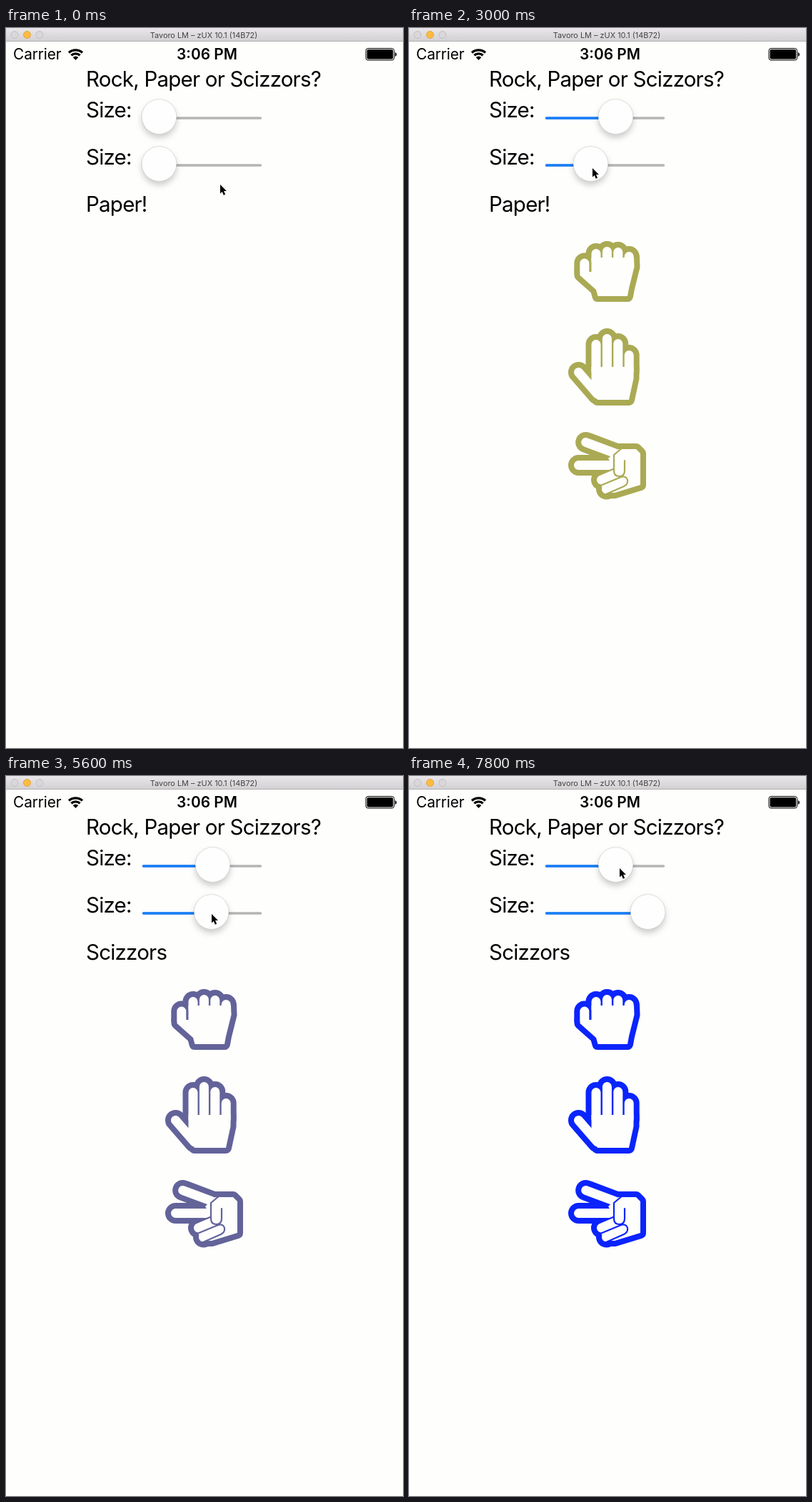
An HTML page that plays this animation: 556x1007 px, repeating every 8 s.

```html
<!DOCTYPE html>
<html lang="en">
<head>
<meta charset="utf-8">
<style>
  html, body { margin: 0; width: 100%; height: 100%; overflow: hidden; background: #fefefd; }
  svg { display: block; }
  text { font-family: Inter, sans-serif; }
  .body { font-size: 29.5px; letter-spacing: -.78px; }
  .status { font-size: 20.85px; }
  .track { stroke-width: 3.4; stroke-linecap: round; }
  .hand { --paper: #fefefd; stroke-linejoin: round; stroke-linecap: round; }
  .edge { fill: none; stroke: currentColor; stroke-width: 29; }
  .edge.palm { fill: currentColor; stroke-width: 16; }
  .skin { fill: none; stroke: var(--paper); stroke-width: 13; }
  .skin.palm { fill: var(--paper); stroke: none; }
  .crease { fill: none; stroke: currentColor; stroke-width: 2.2; }
</style>
</head>
<body>
<svg width="556" height="1007" viewBox="0 0 556 1007">
  <defs>
    <linearGradient id="bar" x2="0" y2="1">
      <stop stop-color="#e9e7e9"/><stop offset="1" stop-color="#d1cfd1"/>
    </linearGradient>
    <filter id="shadow" x="-40%" y="-40%" width="180%" height="190%">
      <feDropShadow dx="0" dy="5" stdDeviation="4.5" flood-color="#000" flood-opacity=".2"/>
    </filter>
  </defs>

  <rect width="556" height="19" fill="url(#bar)"/>
  <path d="M0 18.5H556" stroke="#b3b1b3"/>
  <g fill="#d9d7d9" stroke="#c2c0c2">
    <circle cx="12" cy="9.5" r="5"/>
    <circle cx="29.5" cy="9.5" r="5" fill="#fdbc40" stroke="#e0a23a"/>
    <circle cx="47" cy="9.5" r="5"/>
  </g>
  <text x="277" y="14" font-size="10.9" text-anchor="middle" fill="#444">Tavoro LM – zUX 10.1 (14B72)</text>

  <text class="status" x="10" y="44.3" letter-spacing="-.1">Carrier</text>
  <g fill="none" stroke="#000" stroke-width="3.3">
    <path d="M88 34.5A14 14 0 0 1 107 34.5M91.4 38.3A9 9 0 0 1 103.6 38.3"/>
    <path d="M97.5 45L93.7 41A5.4 5.4 0 0 1 101.3 41Z" fill="#000" stroke="none"/>
  </g>
  <text class="status" x="281.5" y="44.3" text-anchor="middle" font-weight="600">3:06 PM</text>
  <rect x="504" y="28.5" width="39.5" height="16.5" rx="3" fill="none" stroke="#000"/>
  <rect x="505.5" y="30" width="36.5" height="13.5" rx="1.8"/>
  <path d="M544.8 34Q547 34.5 547 37Q547 39.5 544.8 40Z"/>

  <g class="body">
    <text x="112" y="81.5">Rock, Paper or Scizzors?</text>
    <text x="112" y="124.5">Size:</text>
    <text x="112" y="190.5">Size:</text>
    <text id="label" x="112" y="256.5"></text>
  </g>
  <g id="sliders"></g>
  <g id="hands"></g>
  <path id="cursor" d="M0 0V12.5L2.8 9.9L4.8 14.8L7.1 13.8L5.1 9H8.9Z" stroke="#fff" paint-order="stroke"/>
</svg>
<script>
const LOOP = 8000, STEP = 200, MID = 277.8;
const $ = id => document.getElementById(id);
const ramp = (t, a, b) => Math.min(1, Math.max(0, (t - a) / (b - a)));
const easeOut = k => 1 - (1 - k) ** 2;
const mix = (a, b, k) => a + (b - a) * k;

function add(parent, tag, attrs) {
  const el = document.createElementNS('http://www.w3.org/2000/svg', tag);
  for (const k in attrs) el.setAttribute(k, attrs[k]);
  return parent.appendChild(el);
}

const thumbX = v => 214.5 + 120 * v;

function makeSlider(y) {
  const g = add($('sliders'), 'g', { transform: `translate(0 ${y})` });
  add(g, 'path', { class: 'track', stroke: '#b5b5b5', d: 'M192.5 126H356.5' });
  const fill = add(g, 'path', { class: 'track', stroke: '#157efb' });
  const thumb = add(g, 'circle', {
    r: 24.4, cy: 124, fill: '#fefefe', stroke: '#000', 'stroke-opacity': .16,
    'stroke-width': .8, filter: 'url(#shadow)'
  });
  return v => {
    fill.setAttribute('d', `M192.5 126H${thumbX(v)}`);
    thumb.setAttribute('cx', thumbX(v));
  };
}

// four upright fingers side by side
const fingers = (tops, end) => tops.map((y, i) => `M${262 + i * 15.4} ${y}V${end}`).join('');

// y: centre at full size, top: where the centre goes as the hand shrinks to nothing
const hands = [
  { name: 'Rock!', tap: 3800, y: 340.5, top: 279,
    bones: fingers([315.5, 312.5, 313.5, 319.5], 326) + 'M245.8 329V341',
    palm: 'M255.5 321H315L315.5 334L308 364L306 375H264.5L262 366L239.5 346V341H255.5Z',
    crease: '' },
  { name: 'Paper!', tap: 4400, y: 474, top: 301.5,
    bones: fingers([442.5, 434.5, 441.5, 457.5], 480) + 'M237.5 481.5L264 512',
    palm: 'M255.5 474H314.5V490L308 520H264L255.5 505Z',
    crease: '' },
  { name: 'Scizzors', tap: 5000, y: 611.5, top: 323.5,
    bones: 'M247.7 579.5L288 594.5M237.5 611.5H282M269.5 632L290 622.5M276.5 645L298 635',
    palm: 'M279 602L293 589H318L324 595V639L288 650H274L264 629L288 617Z',
    crease: 'M299 587L287 597V619Q287 627 294.5 627Q302 627 302 619V605M264 626L287 616.5M268 640L297 628Q304 626 306 632Q307 638 301 641L276 652' }
];
for (const h of hands) {
  h.el = add($('hands'), 'g', { class: 'hand' });
  for (const layer of ['edge', 'skin']) {
    add(h.el, 'path', { class: layer, d: h.bones });
    add(h.el, 'path', { class: layer + ' palm', d: h.palm });
  }
  add(h.el, 'path', { class: 'crease', d: h.crease });
}

// slider values over time
const sizeAt = t => .41 * easeOut(ramp(t, 600, 2000)) + .27 * ramp(t, 2000, 2200) - .055 * ramp(t, 2200, 2400);
const tintAt = t => .333 * ramp(t, 2600, 3000) + .4 * ramp(t, 3000, 3400) - .123 * ramp(t, 3400, 3600)
  + .04 * ramp(t, 6200, 6800) + .35 * ramp(t, 6800, 7400);

// pointer legs: start, end, goal; a goal on a thumb keeps following it
const legs = [
  [200, 600, t => [thumbX(sizeAt(t)) + 4, 153]],
  [2400, 2600, t => [thumbX(tintAt(t)) + 2.5, 196]],
  [3600, 3800, () => [286, 338]],
  [3800, 4400, () => [289, 500]],
  [4600, 5000, () => [280, 612]],
  [5200, 5600, () => [288, 193]],
  [5600, 6200, t => [thumbX(tintAt(t)) + 9.5, 189]],
  [7400, 7800, () => [295, 129]]
];
const pointerAt = t => legs.reduce((p, [a, b, goal]) => {
  const k = easeOut(ramp(t, a, b)), g = goal(t);
  return p.map((v, i) => mix(v, g[i], k));
}, [300, 219]);

// yellow to blue
function colorAt(v) {
  const warm = 255 * (1 - v);
  return `rgb(${Math.max(11, warm)}, ${Math.max(36, warm)}, ${Math.max(56, 252 * v)})`;
}

const setSize = makeSlider(0), setTint = makeSlider(66);

function render(t) {
  const size = sizeAt(t), tint = tintAt(t);
  setSize(size);
  setTint(tint);
  const scale = size && .04 + 1.536 * size;
  let label = 'Paper!';
  for (const h of hands) {
    const since = t - h.tap;
    if (since >= 0) label = h.name;
    h.el.setAttribute('transform', `translate(${MID} ${mix(h.top, h.y, scale)}) scale(${scale}) translate(${-MID} ${-h.y})`);
    h.el.style.color = colorAt(tint);
    h.el.style.opacity = since < 0 ? 1 : mix(.25, 1, ramp(since, 0, 550));
  }
  $('label').textContent = label;
  $('cursor').setAttribute('transform', `translate(${pointerAt(t)})`);
}

const start = performance.now();
function tick() {
  const t = (performance.now() - start) % LOOP;
  render(Math.floor(t / STEP) * STEP);
  requestAnimationFrame(tick);
}
render(0);
requestAnimationFrame(tick);
</script>
</body>
</html>
```
